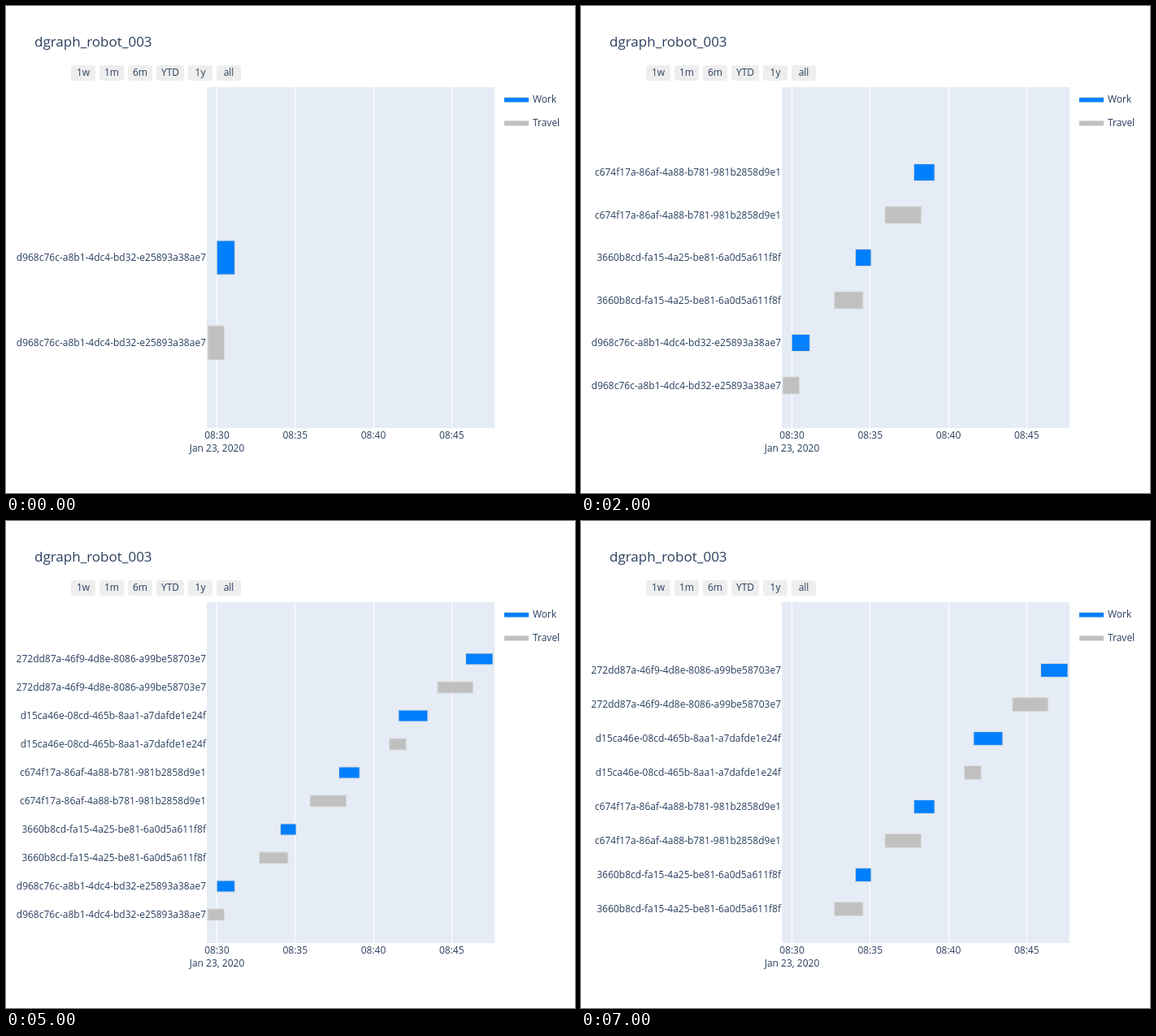
Animation, 700 px wide and 600 px high, one loop 8000 ms. Source, as an HTML page:

```html
<!DOCTYPE html>
<html lang="en">
<head>
<meta charset="utf-8">
<title>dgraph_robot_003</title>
<style>
  html, body { margin: 0; width: 100%; height: 100%; overflow: hidden; background: #fff; }
  svg { display: block; }
  text { font: 12px "Open Sans", sans-serif; fill: #2a3f5f; white-space: pre; }
  .title { font-size: 17px; }
  .middle { text-anchor: middle; }
  .end { text-anchor: end; }
</style>
</head>
<body>
<svg id="chart" width="700" height="600" viewBox="0 0 700 600"></svg>
<script>
const plot = { left: 247, right: 601, top: 100, bottom: 520 };
const color = { work: "#0080ff", travel: "#c0c0c0", edge: "#dcdcdc", grid: "#fff" };
const halfBar = 0.2; // in row units
const stepTime = 1000;

// Horizontal spans of each task in pixels.
const tasks = [
  { id: "d968c76c-a8b1-4dc4-bd32-e25893a38ae7", travel: [248.2, 268.6], work: [259.2, 281.6] },
  { id: "3660b8cd-fa15-4a25-be81-6a0d5a611f8f", travel: [311.6, 346.9], work: [337.5, 357] },
  { id: "c674f17a-86af-4a88-b781-981b2858d9e1", travel: [374, 418.6], work: [409.4, 435.1] },
  { id: "d15ca46e-08cd-465b-8aa1-a7dafde1e24f", travel: [471.7, 492.2], work: [482.9, 518.9] },
  { id: "272dd87a-46f9-4d8e-8086-a99be58703e7", travel: [530.8, 574.7], work: [565.5, 599] },
];
const rows = tasks.flatMap(task =>
  ["travel", "work"].map(kind => ({ id: task.id, kind, span: task[kind] })));

// Visible rows at each step: [first, end).
const steps = [[0, 2], [0, 4], [0, 6], [0, 8], [0, 10], [0, 10], [1, 10], [2, 10]];

function add(parent, name, attributes, content = "") {
  const node = document.createElementNS("http://www.w3.org/2000/svg", name);
  for (const [key, value] of Object.entries(attributes)) node.setAttribute(key, value);
  node.textContent = content;
  return parent.appendChild(node);
}

const rect = (parent, x, y, width, height, fill, extra = {}) =>
  add(parent, "rect", { x, y, width, height, fill, ...extra });
const label = (parent, content, x, y, style = "") =>
  add(parent, "text", { x, y, class: style }, content);

function drawFrame(chart) {
  label(chart, "dgraph_robot_003", 35, 50, "title");

  let x = 80;
  for (const name of ["1w", "1m", "6m", "YTD", "1y", "all"]) {
    const width = name === "YTD" ? 34 : 30;
    rect(chart, x, 73, width, 19, "#eee", { rx: 3 });
    label(chart, name, x + width / 2, 86, "middle");
    x += width + 5;
  }

  rect(chart, plot.left, plot.top, plot.right - plot.left, plot.bottom - plot.top, "#e5ecf6");
  ["08:30", "08:35", "08:40", "08:45"].forEach((time, i) => {
    const tick = 259.5 + 96.25 * i;
    rect(chart, Math.floor(tick), plot.top, 1, plot.bottom - plot.top, color.grid);
    label(chart, time, tick, 533, "middle");
  });
  label(chart, "Jan 23, 2020", 259.5, 548.6, "middle");

  [["Work", color.work], ["Travel", color.travel]].forEach(([name, fill], i) => {
    const y = 114.5 + 29 * i;
    rect(chart, 613, y - 2, 30, 6, fill);
    rect(chart, 613, y - 2.5, 30, 1, color.edge);
    label(chart, name, 648, y + 4.68);
  });
}

function drawStep(group, [first, end]) {
  group.replaceChildren();
  const unit = (plot.bottom - plot.top) / (end - first + 2);
  rows.slice(first, end).forEach(({ id, kind, span }, i) => {
    const y = plot.bottom - unit * (i + 1);
    rect(group, span[0], y - halfBar * unit, span[1] - span[0], 2 * halfBar * unit,
      color[kind], { stroke: color.edge, "stroke-width": 1 });
    label(group, id, plot.left - 1, y + 4.2, "end");
  });
}

const chart = document.getElementById("chart");
drawFrame(chart);
const bars = add(chart, "g", {});
const start = performance.now();
let shown = -1;

function update() {
  const step = Math.floor((performance.now() - start) / stepTime) % steps.length;
  if (step !== shown) {
    drawStep(bars, steps[step]);
    shown = step;
  }
  requestAnimationFrame(update);
}
update();
</script>
</body>
</html>
```
